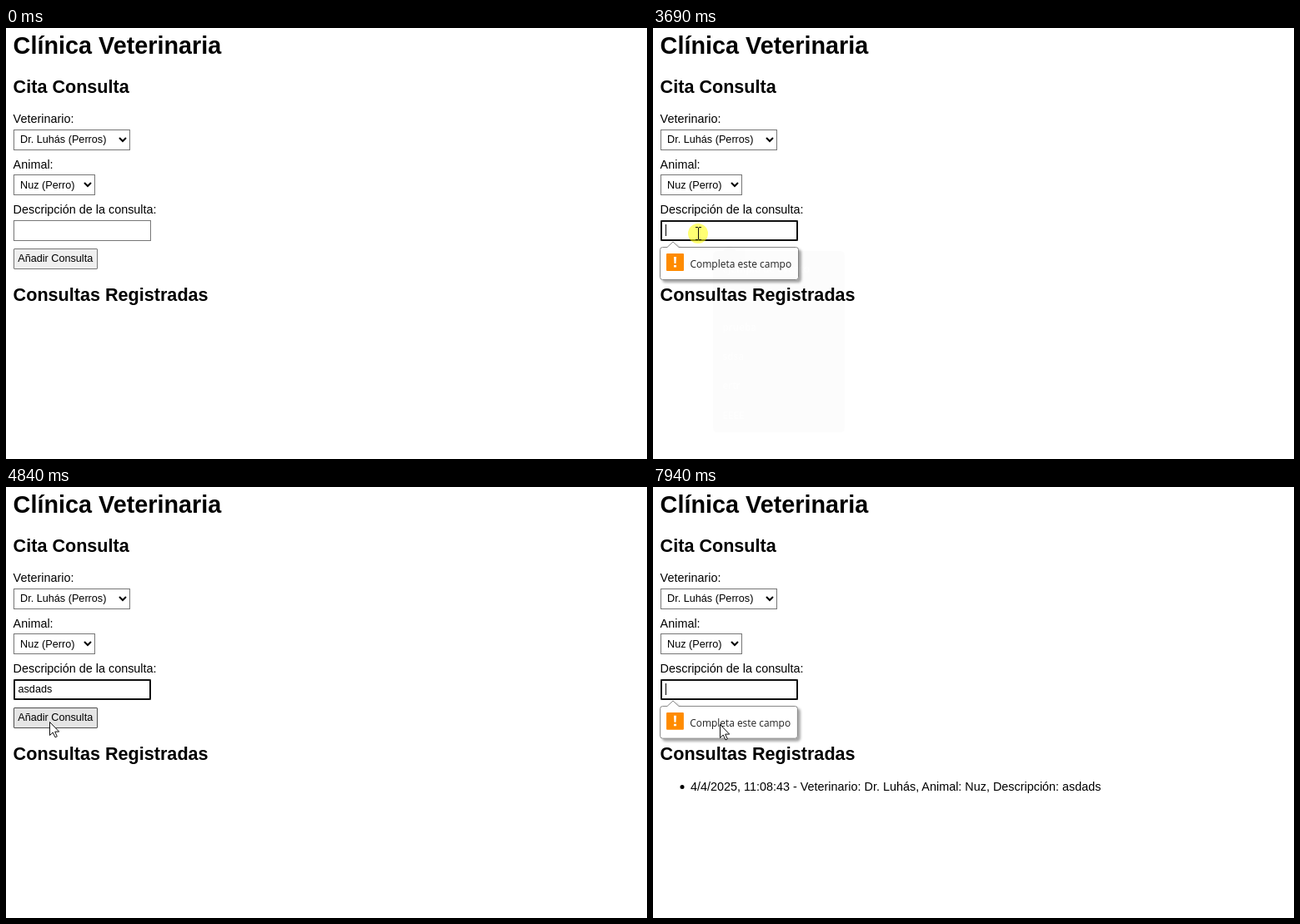
Write an HTML page that moves like this. It is 769 by 518 pixels and loops after 8000 ms.

```html
<!DOCTYPE html>
<html lang="es">
<head>
<meta charset="utf-8">
<title>Clínica Veterinaria</title>
<style>
  html, body { margin: 0; width: 100%; height: 100%; overflow: hidden; background: #fff; }
  svg { display: block; }
  text { font: 14.4px "Liberation Sans", Arial, sans-serif; white-space: pre; }
  .h1 { font-size: 28.8px; font-weight: bold; }
  .h2 { font-size: 21.6px; font-weight: bold; }
  .control text { font-size: 12.67px; }
  .control rect { fill: #fff; stroke: #767676; }
  .control path { fill: none; stroke: #000; stroke-width: 2; }
  #tip text { font: 12px "Open Sans", "Noto Sans", sans-serif; fill: #222; }
  #popup text { font: 600 11.7px "Open Sans", "Noto Sans", sans-serif; fill: #d4d4d4; }
</style>
</head>
<body>
<svg width="769" height="518" viewBox="0 0 769 518">
  <defs>
    <filter id="shadow" x="-10%" y="-20%" width="125%" height="150%">
      <feDropShadow dx="3" dy="3" stdDeviation="1.5" flood-opacity=".35"/>
    </filter>
    <filter id="soft" x="-10%" y="-10%" width="120%" height="120%">
      <feDropShadow dx="0" dy="1" stdDeviation="1.5" flood-opacity=".35"/>
    </filter>
  </defs>

  <text class="h1" x="8.6" y="31">Clínica Veterinaria</text>
  <text class="h2" x="8.6" y="78">Cita Consulta</text>
  <text x="8.6" y="114">Veterinario:</text>
  <text x="8.6" y="169">Animal:</text>
  <text x="8.6" y="223">Descripción de la consulta:</text>
  <text class="h2" x="8.6" y="328">Consultas Registradas</text>

  <g class="control">
    <rect x="9.5" y="122.5" width="139" height="24"/>
    <text x="17" y="138">Dr. Luhás (Perros)</text>
    <path d="M136 132l4 4 4-4"/>
    <rect x="9.5" y="176.5" width="97" height="24"/>
    <text x="17" y="193">Nuz (Perro)</text>
    <path d="M94 186l4 4 4-4"/>
    <rect x="9.5" y="231.5" width="164" height="24"/>
    <rect id="focus" x="10" y="232" width="163" height="23" rx="1" style="stroke:#101010;stroke-width:2"/>
    <text id="typed" x="14.5" y="247"></text>
    <rect id="button" x="9.5" y="265.5" width="100" height="24" rx=".5"/>
    <text x="14.2" y="281">Añadir Consulta</text>
  </g>
  <rect id="caret" y="236" width="1" height="14"/>

  <g id="entry">
    <circle cx="35" cy="360.5" r="2.5"/>
    <text x="45" y="365">4/4/2025, 11:08:43 - Veterinario: Dr. Luhás, Animal: Nuz, Descripción: asdads</text>
  </g>

  <g id="tip">
    <path d="M11.5 263.5H17L24 257l7 6.5H171.5q3 0 3 3V299.5q0 3-3 3H11.5q-3 0-3-3V266.5q0-3 3-3z"
      fill="#fff" stroke="#848484" filter="url(#shadow)"/>
    <rect x="16" y="271" width="21" height="21" rx="1" fill="#ff8b00"/>
    <path d="M25 275h3l-.5 8h-2zM25 285h3v2.5h-3z" fill="#fff"/>
    <text x="44.4" y="288">Completa este campo</text>
  </g>

  <g id="popup">
    <path d="M77 268H84L92 260l8 8H225q5 0 5 5V481q0 5-5 5H77q-5 0-5-5V273q0-5 5-5z"
      fill="#2b2b2b" filter="url(#soft)"/>
  </g>

  <circle id="click" r="12" fill="#ff0" opacity=".55"/>
  <g id="cursor">
    <path id="arrow" d="M.5 .5V16.5L4.2 13 7 18.8 9.3 17.8 6.7 12.1H11.7z" fill="#fff" stroke="#111"/>
    <path id="beam" d="M-3-7.5H0M1-7.5H4M.5-7V7M-3 7.5H0M1 7.5H4" fill="none" stroke="#111"/>
  </g>
</svg>
<script>
const LOOP = 8000;
const $ = id => document.getElementById(id);
const clamp = v => Math.min(1, Math.max(0, v));
const ramp = (t, from, to) => clamp((t - from) / (to - from));
const within = (t, spans) => spans.some(([from, to]) => t >= from && t < to);
const show = (id, visible) => $(id).style.display = visible ? '' : 'none';

const suggestions = ['ejemplo de evento', 'sdasdf', 'prueba', 'sdsa', 'ertr', 'EEEE'];
suggestions.forEach((label, i) => {
  const row = document.createElementNS('http://www.w3.org/2000/svg', 'text');
  row.setAttribute('x', 83.5);
  row.setAttribute('y', 294 + 35.1 * i);
  row.textContent = label;
  $('popup').append(row);
});

// Pointer stops: time, x, y
const stops = [
  [380, 692, 508], [1190, 81, 298], [1280, 77, 290], [1390, 73, 284],
  [2640, 73, 284], [3120, 56, 248], [3290, 56, 248], [3380, 55, 250], [3490, 54, 247],
  [4140, 54, 247], [4430, 52, 280], [4510, 52, 282],
  [6030, 52, 282], [6400, 70, 245], [6900, 70, 245], [7110, 92, 289],
  [7180, 92, 289], [7390, 80, 285], [LOOP, 80, 285]
];
const word = 'asdads';
const keyTimes = [3760, 3830, 3930, 4100, 4240, 4340];
const caretResets = [1640, 3690, ...keyTimes, 6450, 7500];
const clicks = [1600, 3690, 5040, 6450, 7430].map(at => [at, at + 70]);
const focusSpans = [[1670, 5040], [6450, 7040], [7500, LOOP]];
const submitted = 5110;

function pointerAt(t) {
  const i = Math.max(1, stops.findIndex(stop => stop[0] > t));
  const [t0, x0, y0] = stops[i - 1], [t1, x1, y1] = stops[i];
  const k = (1 - Math.cos(Math.PI * ramp(t, t0, t1))) / 2;
  return [x0 + (x1 - x0) * k, y0 + (y1 - y0) * k];
}

function drawPointer(t, x, y) {
  const overField = x > 9 && x < 174 && y >= 231 && y < 256;
  const overButton = x > 9 && x < 110 && y >= 265 && y < 288.5;
  const pressed = within(t, clicks);
  show('cursor', t >= 390);
  show('arrow', !overField);
  show('beam', overField);
  $('cursor').setAttribute('transform', `translate(${Math.round(x)} ${Math.round(y)})`);
  show('click', pressed);
  $('click').setAttribute('cx', x);
  $('click').setAttribute('cy', y);
  const [fill, stroke] = !overButton ? ['#efefef', '#767676']
    : pressed ? ['#f5f5f5', '#8d8d8d'] : ['#e5e5e5', '#4f4f4f'];
  $('button').style.fill = fill;
  $('button').style.stroke = stroke;
}

function drawField(t) {
  const focused = within(t, focusSpans);
  const count = t < submitted ? keyTimes.filter(at => at <= t).length : 0;
  $('typed').textContent = word.slice(0, count);
  const lastReset = Math.max(...caretResets.filter(at => at <= t));
  const blinkOn = Math.floor((t - lastReset) / 500) % 2 === 0;
  show('focus', focused);
  show('caret', focused && blinkOn);
  const width = count ? $('typed').getComputedTextLength() : 0;
  $('caret').setAttribute('x', Math.round(14.6 + width));
}

function drawOverlays(t) {
  const opened = t >= 7500 ? 7500 : 1670;
  const age = t - opened;
  const closing = opened === 1670 ? ramp(t, 3690, 3975) : 0;
  const opacity = clamp(age / 200) * (1 - closing);
  const scale = age < 700 ? 1 - 0.1 * Math.exp(-age / 170) : 1;
  show('tip', opacity > 0);
  $('tip').style.opacity = opacity;
  $('tip').setAttribute('transform', `translate(24 257) scale(${scale}) translate(-24 -257)`);

  const popup = ramp(t, 3690, 3800) * (1 - ramp(t, 3900, 4035));
  show('popup', popup > 0);
  $('popup').style.opacity = popup;
}

function render() {
  const t = performance.now() % LOOP;
  drawPointer(t, ...pointerAt(t));
  drawField(t);
  drawOverlays(t);
  show('entry', t >= submitted);
  requestAnimationFrame(render);
}
render();
</script>
</body>
</html>
```
